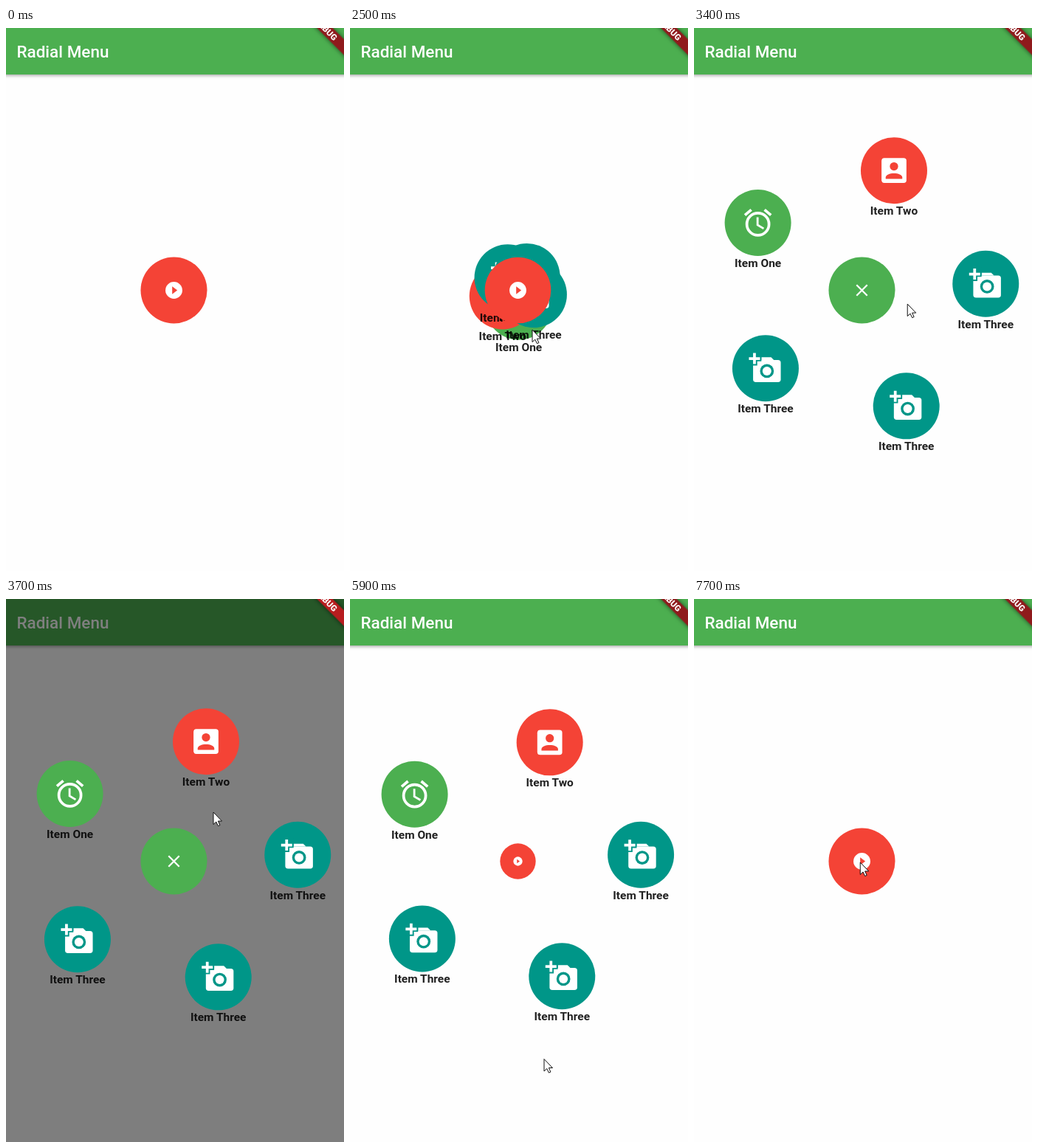
Recreate the animation shown at these times as an HTML page. Size 458 px wide and 736 px high, loop 8000 ms.

```html
<!DOCTYPE html>
<html lang="en">
<head>
<meta charset="utf-8">
<title>Radial Menu</title>
<style>
  html, body { margin: 0; width: 100%; height: 100%; overflow: hidden; background: #fefefe; }
  svg { display: block; font-family: Roboto, sans-serif; }
  .bar { fill: #4caf50; filter: drop-shadow(0 1.5px 2.5px rgba(0, 0, 0, .42)); }
  .title { font-size: 22.5px; font-weight: 500; fill: #fff; }
  .label { font-size: 15.5px; font-weight: 700; text-anchor: middle; fill: rgba(0, 0, 0, .87); }
  .icon { fill: #fff; }
  .icon .hole { fill: currentColor; }
  .icon .line { fill: none; stroke: #fff; stroke-width: 2; }
  .banner rect { filter: drop-shadow(0 0 3px rgba(0, 0, 0, .6)); }
  .banner text { font-size: 11.5px; font-weight: 900; text-anchor: end; fill: #fff; }
</style>
</head>
<body>
<svg width="458" height="736" viewBox="0 0 458 736">
  <rect width="458" height="736" fill="#fefefe"/>
  <rect class="bar" x="-10" y="-10" width="478" height="73"/>
  <text class="title" x="14.4" y="40">Radial Menu</text>
  <rect id="dim" width="458" height="736" fill="#000" fill-opacity=".5"/>
  <g id="items"></g>
  <g id="closeButton"></g>
  <g id="openButton"></g>
  <g class="banner" transform="translate(432 0) rotate(45)">
    <rect id="strip" x="-50" y="-7.5" width="120" height="15"/>
    <text x="21" y="4">DEBUG</text>
  </g>
  <path id="cursor" d="M0 0V16.5L3.8 13L6.4 18.6L8.9 17.5L6.4 12H11.5Z" fill="#fff" stroke="#111"/>
</svg>
<script>
const LOOP = 8000, STEP = 100;
const CENTER = [227.5, 355.5], RADIUS = 168;
const OPEN_AT = 2321, CLOSE_AT = 5800, DURATION = 900;
const DIM_FROM = 3600, DIM_TO = 5700;
const RED = '#f44336', GREEN = '#4caf50', TEAL = '#009688';

// Icons live on a 24 by 24 grid
const icons = {
  alarm: `<circle class="line" cx="12" cy="13" r="8"/>
    <path class="line" d="M16.8 2.6l4.6 3.9M7.2 2.6L2.6 6.5"/>
    <path class="line" style="stroke-width:1.5" d="M11.75 8v5.6l4.4 2.6"/>`,
  person: `<rect x="3" y="3" width="18" height="18" rx="2"/><circle class="hole" cx="12" cy="9" r="3"/>
    <path class="hole" d="M6 18v-1c0-4 12-4 12 0v1z"/>`,
  camera: `<rect x="3" y="6" width="20" height="16" rx="2"/><path d="M9 6V4h7l2 2z"/>
    <path class="hole" d="M0 0h9v7H6v3H0z"/><path class="line" d="M4 1v8M0 5h8"/>
    <circle class="hole" cx="13" cy="14" r="5"/><circle cx="13" cy="14" r="3.2"/>`,
  play: '<circle cx="12" cy="12" r="10"/><path class="hole" d="M10 7.5v9l6-4.5z"/>',
  close: '<path class="line" d="M5.7 5.7l12.6 12.6M18.3 5.7L5.7 18.3"/>'
};

const menu = [
  ['Item One', GREEN, 'alarm'],
  ['Item Two', RED, 'person'],
  ...Array(3).fill(['Item Three', TEAL, 'camera'])
];

// Pointer stops: time, x, y
const pointer = [
  [300, 305, 570], [1100, 226, 337], [2300, 226, 357], [2900, 307, 558], [3700, 281, 289],
  [4900, 235, 350], [5500, 228, 356], [5600, 263, 623], [6700, 263, 626], [7100, 226, 354],
  [LOOP, 225, 358]
];

const $ = id => document.getElementById(id);
const clamp = v => Math.min(1, Math.max(0, v));
const show = (el, on) => el.setAttribute('visibility', on ? 'visible' : 'hidden');
const place = (el, x, y, scale = 1) => el.setAttribute('transform', `translate(${x} ${y}) scale(${scale})`);

const disc = (color, icon, size) => `<circle r="45" fill="${color}"/>
  <g class="icon" color="${color}" transform="scale(${size / 24}) translate(-12 -12)">${icons[icon]}</g>`;

$('items').innerHTML = menu.map(([label, color, icon]) =>
  `<g>${disc(color, icon, 45)}<text class="label" y="60">${label}</text></g>`).join('');
$('openButton').innerHTML = disc(RED, 'play', 27.5);
$('closeButton').innerHTML = disc(GREEN, 'close', 27.5);

const smooth = u => u * u * (3 - 2 * u);
const easeInExpo = x => x <= 0 ? 0 : 2 ** (10 * x - 10);

// cubic-bezier(.4, 0, .2, 1), solved by bisection
function fastOutSlowIn(x) {
  let low = 0, high = 1, u = .5;
  for (let i = 0; i < 24; i++) {
    u = (low + high) / 2;
    const v = 1 - u;
    if (1.2 * v * v * u + .6 * v * u * u + u ** 3 < x) low = u; else high = u;
  }
  return smooth(u);
}

function pointerAt(time) {
  const i = Math.max(1, pointer.findIndex(p => p[0] > time));
  const [t0, x0, y0] = pointer[i - 1], [t1, x1, y1] = pointer[i];
  const k = smooth(clamp((time - t0) / (t1 - t0)));
  return [x0 + (x1 - x0) * k, y0 + (y1 - y0) * k];
}

function draw(time) {
  const t = clamp((time - OPEN_AT) / DURATION) - clamp((time - CLOSE_AT) / DURATION);
  const reach = RADIUS * fastOutSlowIn(t);
  const spin = -250 * (1 - clamp(t / .685)) ** 2;
  const dimmed = time >= DIM_FROM && time < DIM_TO;

  show($('items'), t > 0.001);
  [...$('items').children].forEach((item, i) => {
    const angle = (-147 + 72 * i + spin) * Math.PI / 180;
    place(item, CENTER[0] + reach * Math.cos(angle), CENTER[1] + reach * Math.sin(angle));
  });

  const swap = easeInExpo(t);
  place($('openButton'), ...CENTER, 1 - swap);
  place($('closeButton'), ...CENTER, swap);

  show($('dim'), dimmed);
  $('strip').setAttribute('fill', dimmed ? '#b81d1f' : '#8f1a1c');
  show($('cursor'), time >= pointer[0][0]);
  place($('cursor'), ...pointerAt(time));
}

// The screen advances ten times a second
const start = performance.now();
function tick() {
  const time = (performance.now() - start) % LOOP;
  draw(Math.floor(time / STEP) * STEP);
  requestAnimationFrame(tick);
}
tick();
</script>
</body>
</html>
```
